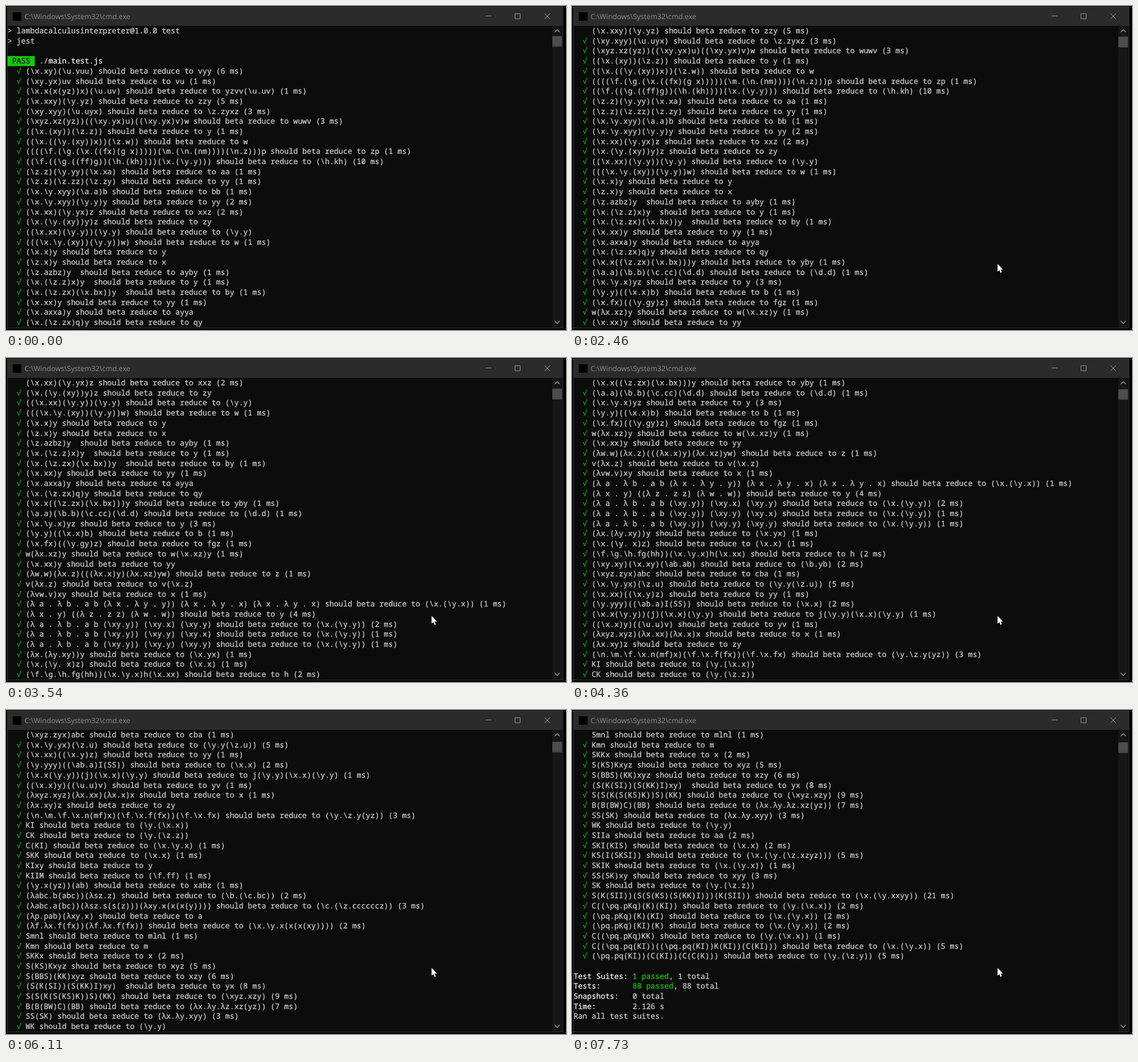
Recreate the animation shown at these times as an HTML page with a canvas. Size 983x570 px, loop 8 s.

```html
<!DOCTYPE html>
<html lang="en">
<head>
<meta charset="utf-8">
<title>Terminal test run</title>
<style>
html, body { margin: 0; width: 100%; height: 100%; overflow: hidden; background: #000; }
canvas { display: block; }
</style>
</head>
<body>
<canvas id="stage" width="983" height="570"></canvas>
<script>
const ctx = document.getElementById('stage').getContext('2d');
const LOOP = 8000, ROWS = 30;
const LEFT = 2.7, TOP = 35, CELL = 7.967, LINE = 17.69, BASE = 13.1;
const MONO = `${CELL / 0.6}px "Noto Sans Mono", "DejaVu Sans Mono", monospace`;
const TITLE = '12.68px "Open Sans", "Noto Sans", sans-serif';
const BACK = '#0c0c0c', TEXT = '#cccccc', BRIGHT = '#f2f2f2';
const GREEN = '#13a10e', LIME = '#16c60c', GLYPH = '#9b9b9b';

// expression | result | milliseconds (optional)
const TESTS = String.raw`(\x.xy)(\u.vuu)|vyy|6
(\xy.yx)uv|vu|1
(\x.x(x(yz))x)(\u.uv)|yzvv(\u.uv)|1
(\x.xxy)(\y.yz)|zzy|5
(\xy.xyy)(\u.uyx)|\z.zyxz|3
(\xyz.xz(yz))((\xy.yx)u)((\xy.yx)v)w|wuwv|3
((\x.(xy))(\z.z))|y|1
((\x.((\y.(xy))x))(\z.w))|w
((((\f.(\g.(\x.((fx)(g x)))))(\m.(\n.(nm))))(\n.z)))p|zp|1
((\f.((\g.((ff)g))(\h.(kh))))(\x.(\y.y)))|(\h.kh)|10
(\z.z)(\y.yy)(\x.xa)|aa|1
(\z.z)(\z.zz)(\z.zy)|yy|1
(\x.\y.xyy)(\a.a)b|bb|1
(\x.\y.xyy)(\y.y)y|yy|2
(\x.xx)(\y.yx)z|xxz|2
(\x.(\y.(xy))y)z|zy
((\x.xx)(\y.y))(\y.y)|(\y.y)
(((\x.\y.(xy))(\y.y))w)|w|1
(\x.x)y|y
(\z.x)y|x
(\z.azbz)y |ayby|1
(\x.(\z.z)x)y |y|1
(\x.(\z.zx)(\x.bx))y |by|1
(\x.xx)y|yy|1
(\x.axxa)y|ayya
(\x.(\z.zx)q)y|qy
(\x.x((\z.zx)(\x.bx)))y|yby|1
(\a.a)(\b.b)(\c.cc)(\d.d)|(\d.d)|1
(\x.\y.x)yz|y|3
(\y.y)((\x.x)b)|b|1
(\x.fx)((\y.gy)z)|fgz|1
w(λx.xz)y|w(\x.xz)y|1
(\x.xx)y|yy
(λw.w)(λx.z)(((λx.x)y)(λx.xz)yw)|z|1
v(λx.z)|v(\x.z)
(λvw.v)xy|x|1
(λ a . λ b . a b (λ x . λ y . y)) (λ x . λ y . x) (λ x . λ y . x)|(\x.(\y.x))|1
(λ x . y) ((λ z . z z) (λ w . w))|y|4
(λ a . λ b . a b (\xy.y)) (\xy.x) (\xy.y)|(\x.(\y.y))|2
(λ a . λ b . a b (\xy.y)) (\xy.y) (\xy.x)|(\x.(\y.y))|1
(λ a . λ b . a b (\xy.y)) (\xy.y) (\xy.y)|(\x.(\y.y))|1
(λx.(λy.xy))y|(\x.yx)|1
(\x.(\y. x)z)|(\x.x)|1
(\f.\g.\h.fg(hh))(\x.\y.x)h(\x.xx)|h|2
(\xy.xy)(\x.xy)(\ab.ab)|(\b.yb)|2
(\xyz.zyx)abc|cba|1
(\x.\y.yx)(\z.u)|(\y.y(\z.u))|5
(\x.xx)((\x.y)z)|yy|1
(\y.yyy)((\ab.a)I(SS))|(\x.x)|2
(\x.x(\y.y))(j)(\x.x)(\y.y)|j(\y.y)(\x.x)(\y.y)|1
((\x.x)y)((\u.u)v)|yv|1
(λxyz.xyz)(λx.xx)(λx.x)x|x|1
(λx.xy)z|zy
(\n.\m.\f.\x.n(mf)x)(\f.\x.f(fx))(\f.\x.fx)|(\y.\z.y(yz))|3
KI|(\y.(\x.x))
CK|(\y.(\z.z))
C(KI)|(\x.\y.x)|1
SKK|(\x.x)|1
KIxy|y
KIIM|(\f.ff)|1
(\y.x(yz))(ab)|xabz|1
(λabc.b(abc))(λsz.z)|(\b.(\c.bc))|2
(λabc.a(bc))(λsz.s(s(z)))(λxy.x(x(x(y))))|(\c.(\z.ccccccz))|3
(λp.pab)(λxy.x)|a
(λf.λx.f(fx))(λf.λx.f(fx))|(\x.\y.x(x(x(xy))))|2
Smnl|mlnl|1
Kmn|m
SKKx|x|2
S(KS)Kxyz|xyz|5
S(BBS)(KK)xyz|xzy|6
(S(K(SI))(S(KK)I)xy) |yx|8
S(S(K(S(KS)K))S)(KK)|(\xyz.xzy)|9
B(B(BW)C)(BB)|(λx.λy.λz.xz(yz))|7
SS(SK)|(λx.λy.xyy)|3
WK|(\y.y)
SIIa|aa|2
SKI(KIS)|(\x.x)|2
KS(I(SKSI))|(\x.(\y.(\z.xzyz)))|5
SKIK|(\x.(\y.x))|1
SS(SK)xy|xyy|3
SK|(\y.(\z.z))
S(K(SII))(S(S(KS)(S(KK)I)))(K(SII))|(\x.(\y.xxyy))|21
C((\pq.pKq)(K)(KI))|(\y.(\x.x))|2
(\pq.pKq)(K)(KI)|(\x.(\y.x))|2
(\pq.pKq)(KI)(K)|(\x.(\y.x))|2
C((\pq.pKq)KK)|(\y.(\x.x))|1
C((\pq.pq(KI))((\pq.pq(KI))K(KI))(C(KI)))|(\x.(\y.x))|5
(\pq.pq(KI))(C(KI))(C(C(K)))|(\y.(\z.y))|5`.split('\n');

// A line is a list of spans: [column, text, color, background]
const testLine = entry => {
  const [expr, result, ms] = entry.split('|');
  const timing = ms ? ` (${ms} ms)` : '';
  return [[2, '√', GREEN], [4, `${expr} should beta reduce to ${result}${timing}`, TEXT]];
};
const summary = (label, passed, rest) => [
  [0, label, BRIGHT], [13, passed, LIME], [13 + passed.length, rest, TEXT]
];
const LINES = [
  [[0, '> lambdacalculusinterpreter@1.0.0 test', TEXT]],
  [[0, '> jest', TEXT]],
  [],
  [[0, ' PASS ', BACK, LIME], [7, './', TEXT], [9, 'main.test.js', BRIGHT]],
  ...TESTS.map(testLine),
  [],
  summary('Test Suites:', '1 passed', ', 1 total'),
  summary('Tests:', '88 passed', ', 88 total'),
  summary('Snapshots:', '', '0 total'),
  summary('Time:', '', '2.126 s'),
  [[0, 'Ran all test suites.', TEXT]]
];

// Each swipe: start, end, then the top line after every even step
const SWIPES = [
  [1390, 1460, 1, 2],
  [1730, 1800, 3, 5],
  [2460, 2800, 7, 9, 11, 12, 13],
  [3330, 3620, 14, 16, 17, 18, 19],
  [4080, 4360, 21, 24, 27, 29, 30],
  [5020, 5230, 33, 37, 40, 41],
  [5820, 6180, 42, 44, 46, 48, 49, 50],
  [6640, 6990, 51, 53, 55, 56, 57, 59],
  [7450, 7730, 61, 64, 66, 68, 69]
];
const SCROLL = SWIPES.flatMap(([start, end, ...tops]) =>
  tops.map((top, i) => [Math.floor((start + (end - start) * i / (tops.length - 1)) / 10) * 10, top]));
const POINTER = [[650, 806, 524], [720, 765, 476], [800, 747, 453.5]];
const THUMB_STOPS = [3, 24, 37, 55];

const latest = (steps, t) => steps.filter(step => step[0] <= t).pop();

function rect(x, y, w, h, color) {
  ctx.fillStyle = color;
  ctx.fillRect(x, y, w, h);
}

function stroke(points, color, width = 1) {
  ctx.strokeStyle = color;
  ctx.lineWidth = width;
  ctx.beginPath();
  points.forEach(([x, y], i) => i ? ctx.lineTo(x, y) : ctx.moveTo(x, y));
  ctx.stroke();
}

// A hairline outline gives the text its sturdier console weight.
function print(text, x, y, color) {
  ctx.fillStyle = ctx.strokeStyle = color;
  ctx.lineWidth = 0.3;
  ctx.fillText(text, x, y);
  ctx.strokeText(text, x, y);
}

function drawWindow() {
  rect(0, 0, 983, 570, '#000');
  rect(2, 1, 976, 566, '#343434');
  rect(3, 2, 974, 33, '#2b2b2b');
  rect(3, 35, 974, 531, BACK);
  rect(12, 11, 15, 15, '#000');

  ctx.font = TITLE;
  ctx.fillStyle = '#8f8f8f';
  ctx.fillText('C:\\Windows\\System32\\cmd.exe', 32.5, 22.6);

  stroke([[842, 17.5], [852, 17.5]], GLYPH);
  ctx.strokeRect(893.5, 13.5, 9, 9);
  stroke([[945, 13], [955, 23]], GLYPH);
  stroke([[955, 13], [945, 23]], GLYPH);
}

function drawScrollbar(top) {
  rect(959, 35, 17, 531, '#171717');
  const shift = THUMB_STOPS.filter(stop => top >= stop).length;
  rect(959, 53 + shift, 17, 18.5, '#4d4d4d');
  if (shift) rect(959, 72, 17, 1, '#6e3030');
  stroke([[963, 46], [967.5, 41.5], [972, 46]], GLYPH, 1.3);
  stroke([[963, 554], [967.5, 558.5], [972, 554]], GLYPH, 1.3);
}

function drawLines(top) {
  ctx.font = MONO;
  for (let row = 0; row < ROWS; row++) {
    const y = TOP + row * LINE;
    for (const [col, text, color, fill] of LINES[top + row] || []) {
      // The first row shows no tick once the list has scrolled.
      if (row === 0 && text === '√') continue;
      const x = LEFT + col * CELL;
      if (fill) rect(x, y, text.length * CELL, LINE, fill);
      print(text, x, y + BASE, color);
    }
  }
}

function drawPointer([, x, y]) {
  ctx.save();
  ctx.translate(x, y);
  ctx.beginPath();
  [[0, 0], [0, 14], [3.1, 11.2], [5.3, 16], [7.4, 15], [5.3, 10.3], [9.6, 10]]
    .forEach(([px, py]) => ctx.lineTo(px, py));
  ctx.closePath();
  ctx.strokeStyle = '#000';
  ctx.lineWidth = 1.4;
  ctx.stroke();
  ctx.fillStyle = '#fff';
  ctx.fill();
  ctx.restore();
}

let shown = '';
function frame(now) {
  const t = now % LOOP;
  const [, top] = latest(SCROLL, t) || [0, 0];
  const pointer = latest(POINTER, t);
  const state = `${top} ${pointer}`;
  if (state !== shown) {
    shown = state;
    drawWindow();
    drawScrollbar(top);
    drawLines(top);
    if (pointer) drawPointer(pointer);
  }
  requestAnimationFrame(tick);
}

const start = performance.now();
const tick = () => frame(performance.now() - start);
ctx.textRendering = 'geometricPrecision';
ctx.lineJoin = 'round';
tick();
</script>
</body>
</html>
```
